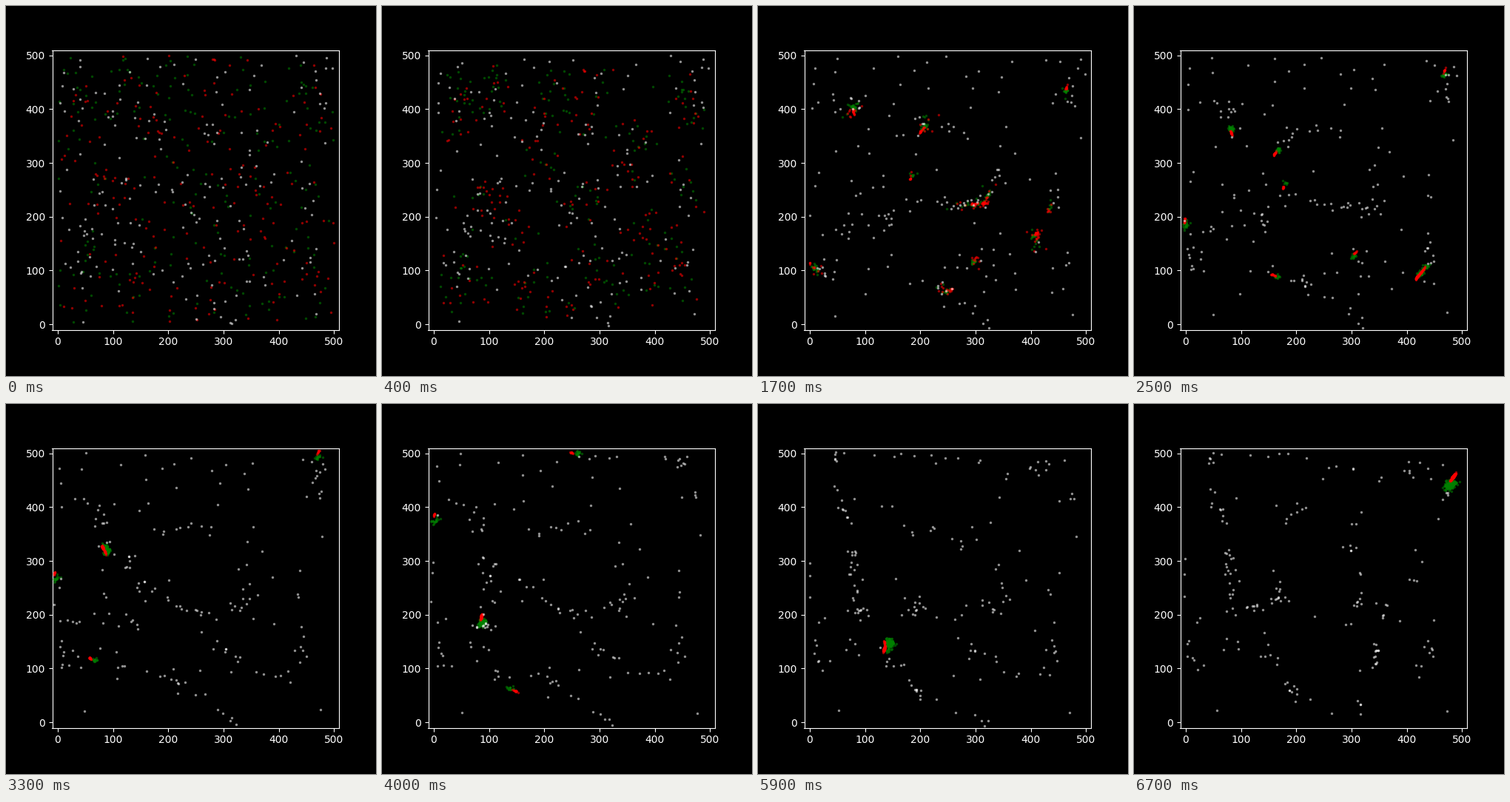
Recreate the animation shown at these times as a matplotlib script. Size 500 by 500 pixels, loop 6800 ms.

```python
import matplotlib.pyplot as plt
import numpy as np
from matplotlib.animation import FuncAnimation

FRAMES, STEP_MS, SUB = 68, 100, 8
N = 190
LOW, HIGH = -7, 505
GATHER = 9
rng = np.random.default_rng(12)

# Key points (time in frames, x, y) of the swarm that absorbs the others
MAIN = [(0, 95, 185), (9, 137, 211), (17, 315, 225), (23, 468, 150),
        (26, 395, 58), (33, 85, 322), (39, 92, 145), (45, 60, 420),
        (48, 8, 504), (54, 400, 482), (59, 139, 142), (62, 180, 400),
        (64, 300, 450), (65, 320, 55), (67, 481, 449)]

# Three packs that stay apart for longer, each ending on MAIN
STRAYS = [
    [(9, 461, 410), (33, 471, 498), (48, 8, 504)],
    [(9, 42, 68), (17, 2, 111), (33, -6, 272), (48, 8, 504)],
    [(9, 207, 46), (17, 255, 65), (33, 63, 118), (48, 236, -4),
     (59, 139, 142)],
]

# Gathering places of the packs that MAIN picks up on its way
HOMES = [(76, 432), (393, 155), (290, 110), (362, 318),
         (458, 278), (188, 286), (268, 232), (240, 400)]


def along(points, t):
    ts, xs, ys = zip(*points)
    return np.array([np.interp(t, ts, xs), np.interp(t, ts, ys)])


def to_meeting(home):
    """Route from home to the spot where MAIN passes nearest."""
    times = np.arange(GATHER + 4, 34)
    gaps = [np.hypot(*(along(MAIN, t) - home)) for t in times]
    t = times[np.argmin(gaps)]
    return [(GATHER, *home), (t, *along(MAIN, t))]


ROUTES = [MAIN] + STRAYS + [to_meeting(h) for h in HOMES]


def joined(k, t):
    return k > 0 and t >= ROUTES[k][-1][0]


def pack_at(k, t):
    return along(MAIN if joined(k, t) else ROUTES[k], t)


class Herd:
    """Agents that gather around their pack, ahead of or behind its centre."""

    def __init__(self, lead, stretch, spread):
        self.start = rng.uniform(0, 500, (N, 2))
        centres = np.array([pack_at(k, GATHER) for k in range(len(ROUTES))])
        gaps = np.linalg.norm(self.start[:, None] - centres, axis=2)
        self.pack = gaps.argmin(axis=1)
        self.settle = rng.uniform(8, 22, N)
        self.lag = 4 * rng.random(N) ** 2
        self.offset = rng.normal(0, 1, (N, 2))
        self.lead, self.stretch, self.spread = lead, stretch, spread

    def at(self, n):
        grown = 0.3 + 0.7 * n / FRAMES
        left = np.clip(1 - n / self.settle, 0, 1)
        times = n - self.lag * max(0, 1 - n / 30)
        spots = np.empty((N, 2))
        for i, (k, t) in enumerate(zip(self.pack, times)):
            pos = pack_at(k, t)
            head = pos - pack_at(k, t - 0.3)
            head = head / (np.hypot(*head) + 1e-6)
            u = self.offset[i]
            swarm = pos + grown * ((self.lead + self.stretch * u[0]) * head
                                   + self.spread * u)
            spots[i] = swarm + left[i] * (self.start[i] - swarm)
        return np.clip(spots, LOW, HIGH)


def drift_whites():
    """Whites wander slowly and are tugged by every pack that passes."""
    pos = rng.uniform(0, 500, (N, 2))
    states = [pos]
    for step in range((FRAMES - 1) * SUB):
        t = step / SUB
        for k in range(len(ROUTES)):
            if joined(k, t):
                continue
            here, ahead = pack_at(k, t), pack_at(k, t + 1 / SUB)
            gap = ahead - pos
            dist = np.hypot(*gap.T)
            near = (dist > 13) & (dist < 62)
            pull = 0.4 * np.hypot(*(ahead - here)) * near
            pull = np.minimum(pull, 0.5 * dist)
            pos = pos + gap * (pull / (dist + 1e-6))[:, None]
        pos = pos + rng.normal(0, 1.5 / SUB ** 0.5, pos.shape)
        pos = np.clip(pos, LOW, HIGH + 3)
        if (step + 1) % SUB == 0:
            states.append(pos)
    return states


greens = Herd(lead=-8, stretch=1, spread=4.5)
reds = Herd(lead=8, stretch=3, spread=1.1)
whites = drift_whites()

plt.style.use("dark_background")
plt.rcParams["font.family"] = "DejaVu Sans"
fig = plt.figure(figsize=(5, 5), dpi=100)
ax = fig.add_axes((0.125, 0.125, 0.775, 0.755))
ax.set(xlim=(-10, 509), ylim=(-10, 509),
       xticks=range(0, 501, 100), yticks=range(0, 501, 100))

green, red, white = (
    ax.scatter([], [], s=6, c=c, alpha=0.57, linewidths=0, zorder=z,
               clip_on=False)
    for z, c in enumerate(("green", "red", "white"), 3))


def draw(n):
    green.set_offsets(greens.at(n))
    red.set_offsets(reds.at(n))
    white.set_offsets(whites[n])
    return green, red, white


anim = FuncAnimation(fig, draw, frames=FRAMES, interval=STEP_MS,
                     init_func=lambda: draw(0), repeat=True, repeat_delay=0)
plt.show()
```
